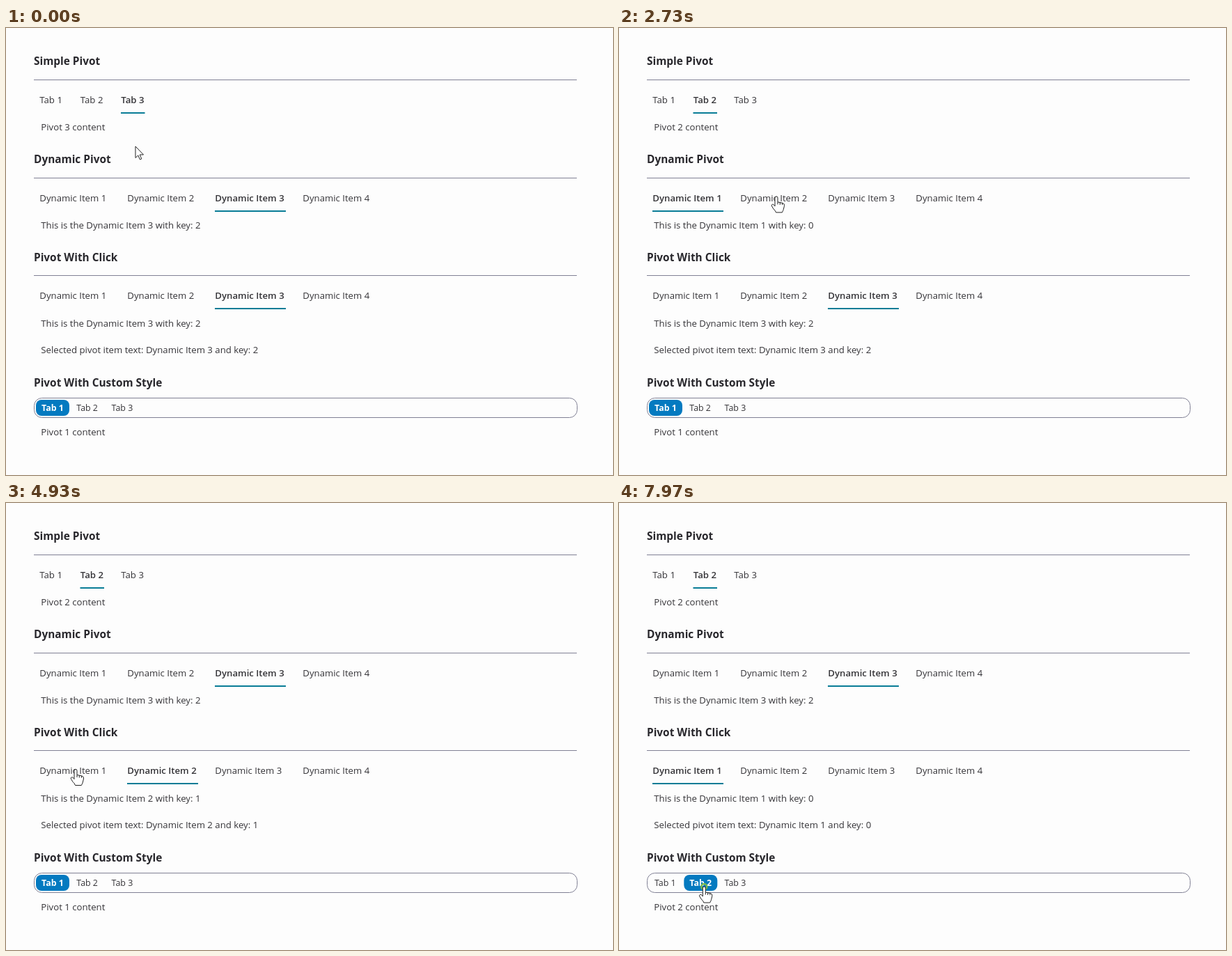
An HTML page for the animation above (8000 ms loop, 872 by 642 pixels).

```html
<!DOCTYPE html>
<html lang="en">
<head>
<meta charset="utf-8">
<title>Pivot samples</title>
<style>
  html, body { margin: 0; width: 100%; height: 100%; overflow: hidden; background: #fdfdfd; }
  svg { display: block; width: 872px; height: 642px; font: 13.2px "Open Sans", "Noto Sans", sans-serif; fill: #353438; }
  .heading { font-size: 15.4px; font-weight: 700; fill: #29282d; }
  .active { font-weight: 600; }
  .small { font-size: 12.4px; }
  .small.active { font-weight: 700; fill: #fff; }
  .rule { stroke: #808094; fill: none; }
  .bar { fill: #087c96; }
  .pill { fill: #047ac0; }
  .mark { fill: #3390f8; }
  .cursor { fill: #fff; stroke: #222; stroke-linejoin: round; }
  .ripple { fill: none; stroke: #7cba4c; stroke-width: 2.5; }
</style>
</head>
<body>
<svg id="stage" viewBox="0 0 872 642"></svg>
<script>
const LOOP = 8000, RIPPLE = 500, TOP = 53.3, PITCH = 140.6;
const stage = document.getElementById('stage');
const labels = (name, count) => Array.from({ length: count }, (_, i) => `${name} ${i + 1}`);
const keyText = (label, i) => `This is the ${label} with key: ${i}`;
const pivotText = (label, i) => `Pivot ${i + 1} content`;

const simple = { left: 48, step: 58.5, width: 34.5, labels: labels('Tab', 3), describe: pivotText, aim: [17.5, 51.5] };
const dynamic = { left: 48, step: 126, width: 102, labels: labels('Dynamic Item', 4), describe: keyText, aim: [52, 48] };
const custom = { ...simple, left: 43, step: 50.3, width: 48, aim: [29, 36], custom: true };
const pivots = [
  { ...simple, title: 'Simple Pivot', y: TOP, selected: 2 },
  { ...dynamic, title: 'Dynamic Pivot', y: TOP + PITCH, selected: 2 },
  { ...dynamic, title: 'Pivot With Click', y: TOP + 2 * PITCH, selected: 2 },
  { ...custom, title: 'Pivot With Custom Style', y: 515, selected: 0 }
];
const tabX = (p, i) => p.left + i * p.step;

const click = (time, pivot, tab) => {
  const p = pivots[pivot], [dx, dy] = p.aim;
  return { time, pivot, tab, x: tabX(p, tab) + dx, y: p.y + dy };
};
const clicks = [
  click(780, 0, 0), click(1475, 0, 1),
  click(2200, 1, 0), click(2880, 1, 1), click(3820, 1, 2),
  click(4380, 2, 1), click(5080, 2, 0),
  click(7895, 3, 1)
];
const drag = { start: 5950, end: 6450, clear: 7050, left: 183, right: 342, y: 463 };

// The pointer rests briefly at every place it visits
const stay = (from, to, x, y) => [{ time: from, x, y }, { time: to, x, y }];
const path = [
  ...stay(0, 0, 186, 170),
  ...stay(1800, 1800, 125, 198),
  ...stay(drag.start - 150, drag.start, drag.left, drag.y),
  ...stay(drag.end, drag.end + 100, drag.right, drag.y),
  ...stay(6770, 6900, 323, 479),
  ...clicks.flatMap(c => stay(c.time - 150, c.time + 110, c.x, c.y))
].sort((a, b) => a.time - b.time);

const cursors = {
  arrow: '<path d="M0 0V16.5l3.8-3.6 2.6 6 2.4-1-2.6-5.9H11.5Z"/>',
  hand: '<path d="M-2 2a2 2 0 0 1 4 0V8l7 1.5q3 .8 2.5 4l-1.2 5q-.5 2-2 4.5H-.5q-1-3-3.5-5l-2.5-4q-1-2 .8-2.6 1.5-.4 3 1.6L-2 14Z"/><path d="M2 8v3.5M5.3 9v3M8.5 9.7v2.5"/>',
  beam: '<path fill="none" stroke-width="1.3" d="M-3.5-8h2.5l1 1 1-1h2.5M0-7V7M-3.5 8h2.5l1-1 1 1h2.5"/>'
};

const text = (x, y, content, cls = '') => `<text x="${x}" y="${Math.round(y)}" class="${cls}">${content}</text>`;
const rect = (x, y, w, h, attrs = '') => `<rect x="${x}" y="${y}" width="${w}" height="${h}" ${attrs}/>`;
const within = (v, from, size) => v >= from && v <= from + size;

function cursorAt(t) {
  const i = path.findIndex(p => p.time > t);
  if (i < 0) return path[path.length - 1];
  const a = path[i - 1], b = path[i];
  const p = (t - a.time) / (b.time - a.time), e = p * p * (3 - 2 * p);
  return { x: a.x + (b.x - a.x) * e, y: a.y + (b.y - a.y) * e };
}

function cursorKind({ x, y }) {
  const overTab = p => within(y, p.y + (p.custom ? 18 : 32), p.custom ? 24 : 38) &&
    p.labels.some((_, i) => within(x, tabX(p, i) - 4, p.width + 8));
  const overText = p =>
    within(y, p.y - 16, 22) && within(x, 40, p.title.length * 8.2) ||
    within(y, p.y + (p.custom ? 55 : 79), 20) && within(x, 50, p.labels.length > 3 ? 230 : 93);
  if (pivots.some(overTab)) return 'hand';
  const overLine = within(y, 452, 20) && within(x, 50, 313);
  return overLine || pivots.some(overText) ? 'beam' : 'arrow';
}

function drawPivot(p, selected) {
  const x = tabX(p, selected);
  let out = text(40, p.y, p.title, 'heading');
  if (p.custom) {
    out += rect(40.5, p.y + 16.5, 780, 28, 'rx="11" class="rule"');
    out += rect(x, p.y + 19, p.width, 23, 'rx="8" class="pill"');
  } else {
    out += `<path class="rule" d="M40 ${Math.round(p.y + 20.9) + 0.5}H820"/>`;
    out += rect(x, Math.round(p.y + 67.9), p.width, 2, 'class="bar"');
  }
  p.labels.forEach((label, i) => {
    const cls = (p.custom ? 'small ' : '') + (i === selected ? 'active' : '');
    out += text(tabX(p, i) + (p.custom ? 8 : 0.3), p.y + (p.custom ? 35 : 54.9), label, cls);
  });
  return out + text(50.3, p.y + (p.custom ? 70 : 94), p.describe(p.labels[selected], selected));
}

function drawSelectedLine(t, item, cursorX) {
  const line = text(50.3, 467, `Selected pivot item text: ${dynamic.labels[item]} and key: ${item}`);
  if (t < drag.start || t >= drag.clear) return line;
  const right = t < drag.end ? cursorX : drag.right;
  const area = cls => rect(drag.left, 453, right - drag.left, 19, cls);
  return line + area('class="mark"') + `<clipPath id="marked">${area()}</clipPath>` +
    `<g clip-path="url(#marked)" fill="#fff">${line}</g>`;
}

function drawRipple(t, { time, x, y }) {
  const p = (t - time) / RIPPLE;
  if (p < 0 || p >= 1) return '';
  const ring = (r, opacity) => `<circle class="ripple" cx="${x}" cy="${y}" r="${r}" opacity="${opacity}"/>`;
  return ring(26 * p, 1 - p * 0.65) + ring(Math.min(4, 26 * p), (1 - p) * 0.6);
}

function render(t) {
  const selected = pivots.map(p => p.selected);
  for (const c of clicks) if (t >= c.time) selected[c.pivot] = c.tab;
  const cursor = cursorAt(t);
  stage.innerHTML =
    pivots.map((p, i) => drawPivot(p, selected[i])).join('') +
    drawSelectedLine(t, selected[2], cursor.x) +
    clicks.map(c => drawRipple(t, c)).join('') +
    `<g class="cursor" transform="translate(${cursor.x} ${cursor.y})">${cursors[cursorKind(cursor)]}</g>`;
}

const origin = performance.now();
function tick() {
  render((performance.now() - origin) % LOOP);
  requestAnimationFrame(tick);
}
tick();
</script>
</body>
</html>
```
